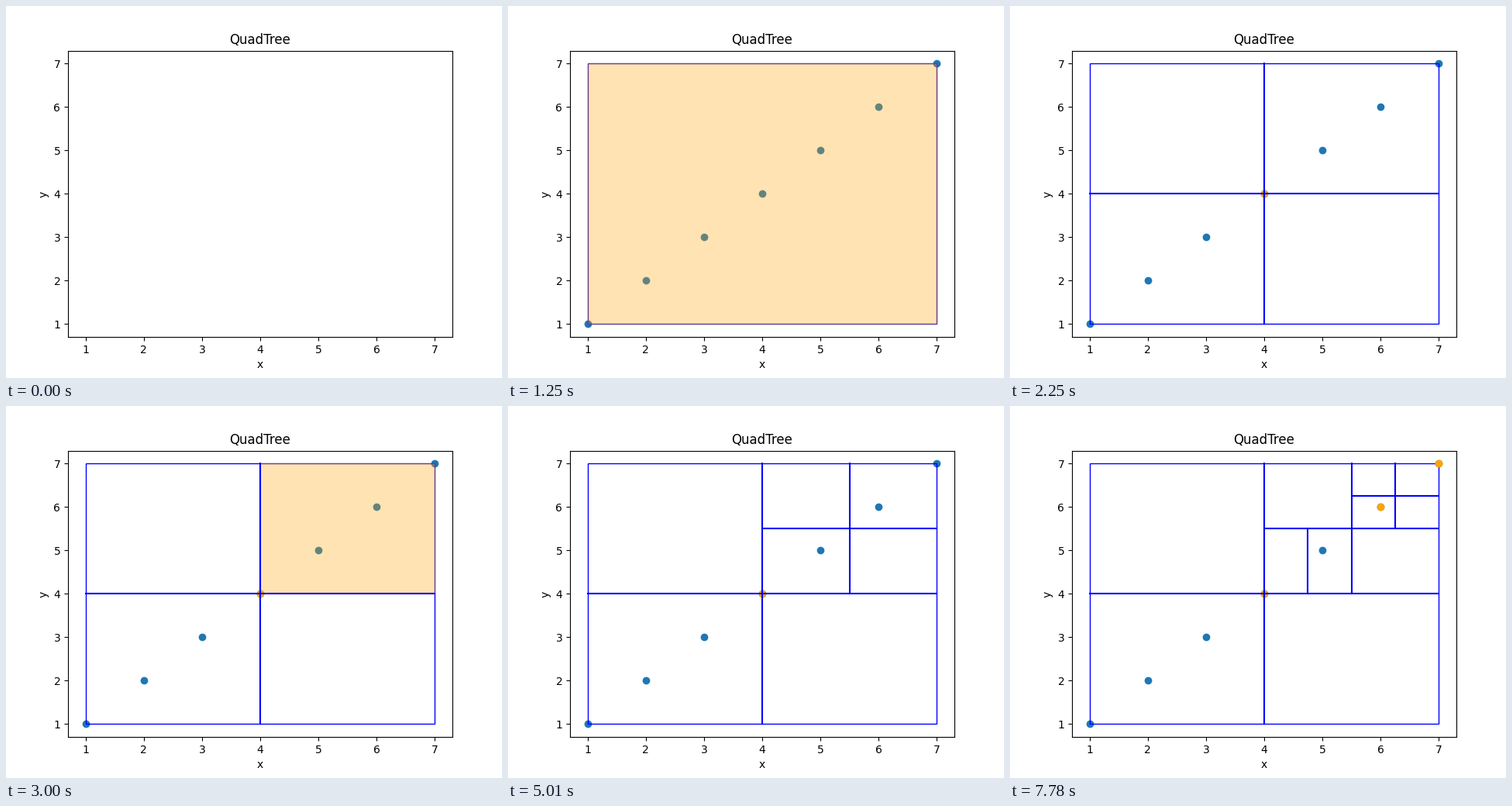
A matplotlib script that plays this animation: 640x480 px, repeating every 8 s.

```python
import math

import matplotlib.pyplot as plt
from matplotlib.animation import FuncAnimation
from matplotlib.patches import Rectangle

FRAMES, INTERVAL = 32, 250
POINTS = [(i, i) for i in range(1, 8)]

fig, ax = plt.subplots(figsize=(6.4, 4.8), dpi=100)
ax.set(xlim=(0.7, 7.3), ylim=(0.7, 7.3), title="QuadTree", xlabel="x", ylabel="y")

spans = []  # (artist, first frame, frame after the last)


def show(artist, start, length=math.inf):
    spans.append((artist, start, start + length))


def dots(points, **style):
    return ax.scatter([p[0] for p in points], [p[1] for p in points], **style)


def box(x0, y0, x1, y1, **style):
    return ax.add_patch(Rectangle((x0, y0), x1 - x0, y1 - y0, **style))


def line(xs, ys):
    return ax.plot(xs, ys, color="blue", scalex=False, scaley=False)[0]


def visit(x0, y0, x1, y1, t):
    """Schedule the steps for one cell from frame t; return the next free frame."""
    if t >= FRAMES:
        return t
    inside = [(x, y) for x, y in POINTS if x0 <= x <= x1 and y0 <= y <= y1]
    if len(inside) < 2:
        # A leaf takes one frame, even when it is empty.
        if inside:
            show(dots(inside, color="orange"), t)
        return t + 1

    show(box(x0, y0, x1, y1, color="orange", alpha=0.3), t, 3)
    show(dots(inside, color="orange"), t + 1, 1)
    xm, ym = (x0 + x1) / 2, (y0 + y1) / 2
    show(line([xm, xm], [y0, y1]), t + 4)
    show(line([x0, x1], [ym, ym]), t + 5)
    t += 6
    for cell in [(x0, ym, xm, y1), (xm, ym, x1, y1),
                 (x0, y0, xm, ym), (xm, y0, x1, ym)]:
        t = visit(*cell, t)
    return t


show(dots(POINTS, color="tab:blue"), 1)
show(box(1, 1, 7, 7, fill=False, edgecolor="blue"), 2)
visit(1, 1, 7, 7, 3)


def update(frame):
    for artist, start, end in spans:
        artist.set_visible(start <= frame < end)
    return [artist for artist, _, _ in spans]


anim = FuncAnimation(fig, update, frames=FRAMES, interval=INTERVAL,
                     repeat=True, repeat_delay=0, blit=False)
plt.show()
```
